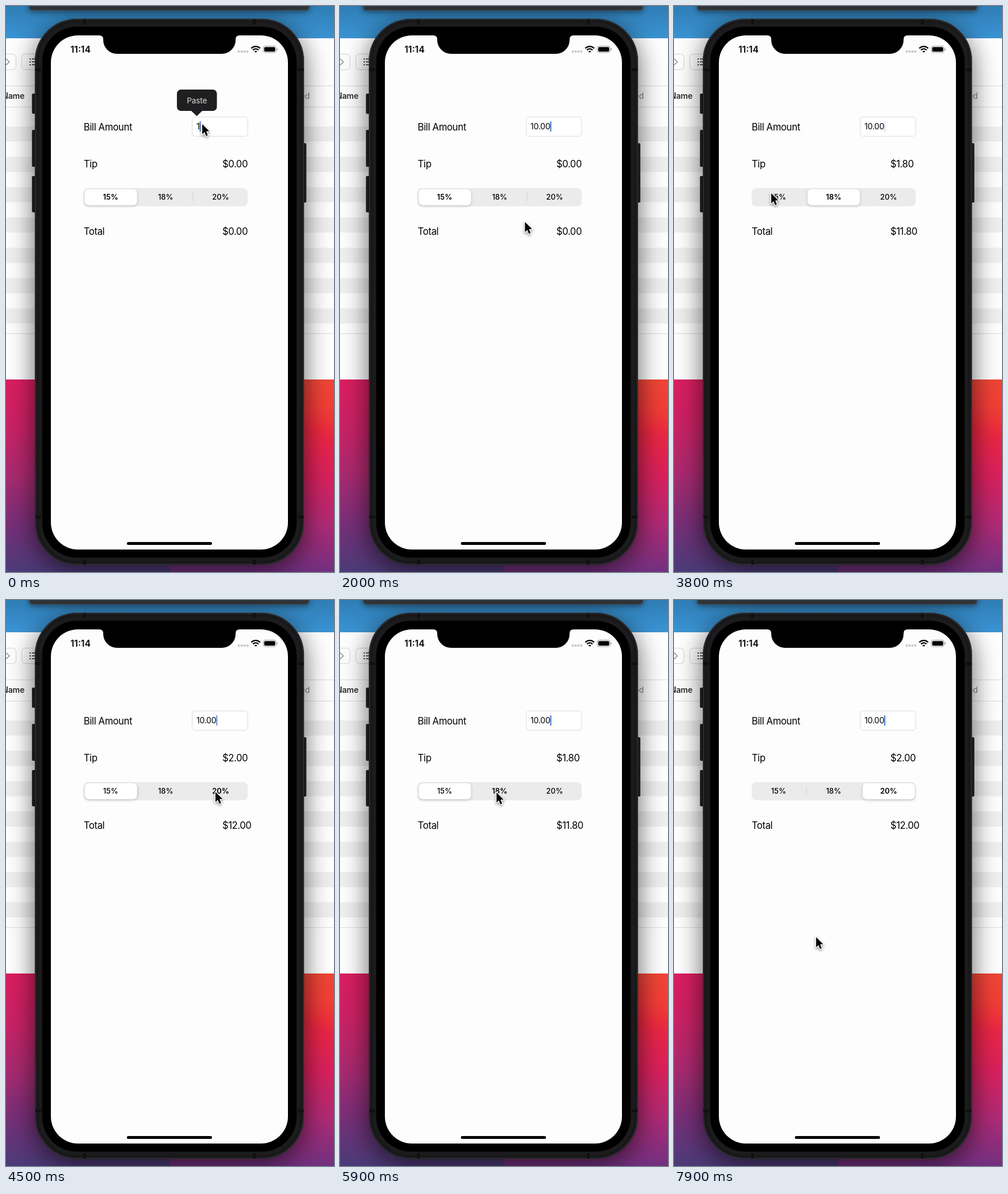
An HTML page with a canvas for the animation above (8 s loop, 570 px wide and 982 px high).

```html
<!DOCTYPE html>
<html lang="en">
<head>
<meta charset="utf-8">
<title>Tip calculator</title>
<style>
  html, body { margin: 0; width: 570px; height: 982px; overflow: hidden; background: #fff; }
  canvas { display: block; }
</style>
</head>
<body>
<canvas id="stage" width="570" height="982"></canvas>
<script>
const W = 570, H = 982, LOOP = 8000, STEP = 100;
const stage = document.getElementById('stage');
const backdrop = document.createElement('canvas');
backdrop.width = W;
backdrop.height = H;
let ctx = backdrop.getContext('2d');

const clamp = v => Math.max(0, Math.min(1, v));
const smooth = v => { v = clamp(v); return v * v * (3 - 2 * v); };

function rect(x, y, w, h, fill) {
  ctx.fillStyle = fill;
  ctx.fillRect(x, y, w, h);
}

function round(x, y, w, h, r, fill, stroke, line = 1) {
  ctx.beginPath();
  ctx.roundRect(x, y, w, h, r);
  if (fill) { ctx.fillStyle = fill; ctx.fill(); }
  if (stroke) { ctx.strokeStyle = stroke; ctx.lineWidth = line; ctx.stroke(); }
}

function text(str, x, y, size, { weight = 400, color = '#000', align = 'left', gap = 0 } = {}) {
  ctx.font = `${weight} ${size}px Inter, "Liberation Sans", sans-serif`;
  ctx.letterSpacing = gap + 'px';
  ctx.textAlign = align;
  ctx.fillStyle = color;
  ctx.fillText(str, x, y);
}

function withShadow(color, blur, dy, draw) {
  ctx.save();
  ctx.shadowColor = color;
  ctx.shadowBlur = blur;
  ctx.shadowOffsetY = dy;
  draw();
  ctx.restore();
}

function gradient(x0, y0, x1, y1, ...colors) {
  const g = ctx.createLinearGradient(x0, y0, x1, y1);
  colors.forEach((c, i) => g.addColorStop(i / (colors.length - 1), c));
  return g;
}

function drawDesktop() {
  rect(0, 0, W, 57, gradient(0, 0, 0, 57, '#2f7db4', '#3489c6', '#3c94d4'));
  rect(0, 648, 285, 334, gradient(0, 648, 0, 982, '#db1d60', '#c92265', '#a92a70', '#782f78', '#4a3b78'));
  rect(285, 648, 285, 334, gradient(0, 648, 0, 982, '#ee4636', '#ec273f', '#d9205c', '#b02a75', '#713080'));
  const glow = ctx.createRadialGradient(566, 690, 0, 566, 690, 60);
  glow.addColorStop(0, 'rgba(246,72,48,.6)');
  glow.addColorStop(1, 'rgba(246,72,48,0)');
  rect(500, 648, 70, 110, glow);
}

function drawWindow() {
  rect(0, 56, W, 592, '#fff');
  for (let i = 0; i < 7; i++) rect(0, 209 + i * 52.6, W, 26.3, '#f0f0f0');
  for (const y of [138, 175, 568]) rect(0, y, W, 1, '#dcdcdc');
  round(-30, 83.5, 47.5, 27, 6, '#fff', '#d2d2d2');
  round(27.5, 83.5, 60, 27, 6, '#fff', '#d2d2d2');
  ctx.strokeStyle = '#8b8b8b';
  ctx.lineWidth = 1.4;
  ctx.beginPath();
  ctx.moveTo(0, 91.5);
  ctx.lineTo(6, 97);
  ctx.lineTo(0, 102.5);
  ctx.stroke();
  for (const y of [91, 96, 101]) {
    rect(41, y, 2, 2, '#3c3c3c');
    rect(45, y, 9, 1.6, '#3c3c3c');
  }
  text('Name', 32, 161, 14, { weight: 600, color: '#2c2c2c', align: 'right', gap: -0.2 });
  text('Modified', 528, 161, 14, { color: '#858585', align: 'right' });
}

function drawToolbar() {
  withShadow('rgba(0,0,0,.5)', 12, 2, () => round(40, -20, 487, 28, 6, '#2f3439'));
  round(40.5, -20, 486, 27.5, 6, null, '#4a4f55');
}

function drawPhone() {
  for (const [y, h] of [[152, 35], [215, 64], [295, 63]])
    round(45, y, 9, h, 2, gradient(45, 0, 54, 0, '#3a3a3c', '#161617', '#101011'));
  round(513, 238, 9, 103, 2, gradient(513, 0, 522, 0, '#101011', '#161617', '#3a3a3c'));
  withShadow('rgba(0,0,0,.62)', 46, 10, () => round(50, 22, 468, 948, 73, '#1c1c1e'));
  round(51, 23, 466, 946, 72, '#1c1c1e', '#313134', 1.5);
  round(55, 27, 458, 938, 68, null, '#171718', 3);
  for (const y of [108, 884]) {
    rect(51, y, 10, 5, '#101011');
    rect(507, y, 10, 5, '#101011');
  }
  for (const x of [134, 429]) {
    rect(x, 23, 5, 9, '#101011');
    rect(x, 960, 5, 9, '#101011');
  }
  round(63, 36, 442, 921, 60, '#000', '#0b0b0c');
  round(78, 51, 412, 892, 47, '#fefdfe');

  // Notch with flared top corners
  ctx.beginPath();
  ctx.moveTo(162, 50);
  ctx.lineTo(162, 51);
  ctx.quadraticCurveTo(169, 51, 169, 58);
  ctx.arcTo(169, 83, 194, 83, 24);
  ctx.arcTo(399, 83, 399, 58, 24);
  ctx.lineTo(399, 58);
  ctx.quadraticCurveTo(399, 51, 406, 51);
  ctx.lineTo(406, 50);
  ctx.fillStyle = '#000';
  ctx.fill();
  round(210, 930, 148, 5, 2.5, '#000');
}

function drawStatus() {
  text('11:14', 129.5, 81, 15.5, { weight: 600, align: 'center' });
  for (let i = 0; i < 4; i++) round(402.5 + i * 5, 77, 4, 4, 1.5, '#c9c9cb');
  ctx.save();
  ctx.beginPath();
  ctx.moveTo(434, 81.5);
  ctx.lineTo(424, 71);
  ctx.lineTo(424, 66);
  ctx.lineTo(444, 66);
  ctx.lineTo(444, 71);
  ctx.clip();
  ctx.strokeStyle = '#000';
  ctx.lineWidth = 2.3;
  for (const r of [1.6, 6.2, 10.4]) {
    ctx.beginPath();
    ctx.arc(434, 80.5, r, Math.PI, 2 * Math.PI);
    ctx.stroke();
  }
  ctx.restore();
  round(447, 69.5, 22.5, 11.5, 3.5, null, '#a0a0a2');
  round(448.7, 71.2, 19.1, 8.1, 2, '#000');
  round(470.6, 73.3, 1.5, 4, 1, '#a0a0a2');
}

const label = { gap: -0.4 };
function drawForm() {
  text('Bill Amount', 135, 215.5, 16.6, label);
  text('Tip', 135, 280, 16.6, label);
  text('Total', 135, 397, 16.6, label);
  round(323.5, 192.5, 96.5, 33.5, 5, '#fff', '#dadade');
  round(135, 316, 285, 31.5, 8, '#ebebeb');
}

drawDesktop();
drawWindow();
drawToolbar();
drawPhone();
drawStatus();
drawForm();

// Typed amount, segment taps and pointer stops: time first
const keys = [[0, '1'], [300, '10'], [500, '10.'], [700, '10.0'], [900, '10.00']];
const rates = [15, 18, 20];
const taps = [[2900, 1], [3900, 0], [4500, 2], [5300, 0], [5900, 1], [6600, 2]];
const stops = [
  [0, 341, 205], [900, 341, 205], [1300, 325, 377], [1900, 325, 377], [2600, 261, 335],
  [3200, 261, 335], [3800, 169, 325], [4000, 169, 325], [4400, 364, 333], [4600, 364, 333],
  [5100, 209, 330], [5200, 183, 331], [5400, 183, 331], [5800, 272, 334], [6000, 272, 334],
  [6500, 379, 344], [6900, 379, 344], [7700, 247, 585], [8000, 247, 585]
];

function pointerAt(t) {
  const i = Math.max(1, stops.findIndex(s => s[0] > t));
  const [t0, x0, y0] = stops[i - 1], [t1, x1, y1] = stops[i];
  const p = smooth((t - t0) / (t1 - t0));
  return [x0 + (x1 - x0) * p, y0 + (y1 - y0) * p];
}

function drawField(t) {
  const value = keys.filter(k => k[0] <= t).pop()[1];
  text(value, 331, 214, 14, { gap: -0.25 });
  const caretX = 331 + ctx.measureText(value).width;
  const phase = t % 990;
  const alpha = t < 1400 ? 1 : Math.max(clamp((620 - phase) / 100), clamp((phase - 810) / 80));
  ctx.globalAlpha = alpha;
  round(caretX, 200, 2, 18, 1, '#3f72cf');
  ctx.globalAlpha = 1;
}

function drawPicker(t) {
  let pick = 0, x = 0, tapped = false;
  for (const [at, next] of taps) {
    if (t < at) break;
    const p = clamp((t - at) / 300);
    x += (next - x) * (1 - (1 - p) ** 2.5);
    pick = next;
    tapped = true;
  }
  if (pick === 2) rect(229.5, 323, 1, 17, '#d2d2d4');
  if (pick === 0) rect(324.5, 323, 1, 17, '#d2d2d4');
  withShadow('rgba(0,0,0,.2)', 5, 1.5, () => round(136.7 + x * 95.5, 317.7, 91, 28, 7, '#fff'));
  rates.forEach((r, i) => text(r + '%', 181.8 + i * 95.6, 336, 13,
    { weight: i === pick ? 600 : 500, align: 'center' }));

  const tip = tapped ? rates[pick] / 10 : 0;
  const total = tapped ? 10 + tip : 0;
  text('$' + tip.toFixed(2), 376, 279.5, 16.6, label);
  text('$' + total.toFixed(2), 376, 397, 16.6, label);
}

function drawPaste(t) {
  ctx.globalAlpha = clamp((400 - t) / 200);
  round(297, 145, 69.5, 37, 7, '#1f1e20');
  ctx.beginPath();
  ctx.moveTo(321.5, 181.5);
  ctx.lineTo(331.5, 191);
  ctx.lineTo(341.5, 181.5);
  ctx.fill();
  text('Paste', 331.7, 168.5, 13.6, { color: '#dcdcdd', align: 'center', gap: -0.15 });
  ctx.globalAlpha = 1;
}

function drawPointer(t) {
  const [x, y] = pointerAt(t);
  ctx.save();
  ctx.translate(x, y);
  ctx.lineJoin = 'round';
  ctx.beginPath();
  [[0, 0], [0, 17.5], [4, 13.8], [6.8, 20.5], [9.7, 19.2], [7, 12.6], [12.3, 12.2]]
    .forEach(p => ctx.lineTo(...p));
  ctx.closePath();
  ctx.strokeStyle = '#fff';
  ctx.lineWidth = 2.6;
  withShadow('rgba(0,0,0,.45)', 4, 2, () => ctx.stroke());
  ctx.fillStyle = '#000';
  ctx.fill();
  ctx.restore();
}

ctx = stage.getContext('2d');

function frame() {
  const now = performance.now() % LOOP;
  const t = Math.floor(now / STEP) * STEP;
  ctx.drawImage(backdrop, 0, 0);
  drawField(t);
  drawPicker(t);
  if (t < 400) drawPaste(t);
  drawPointer(t);
  requestAnimationFrame(frame);
}
frame();
</script>
</body>
</html>
```
